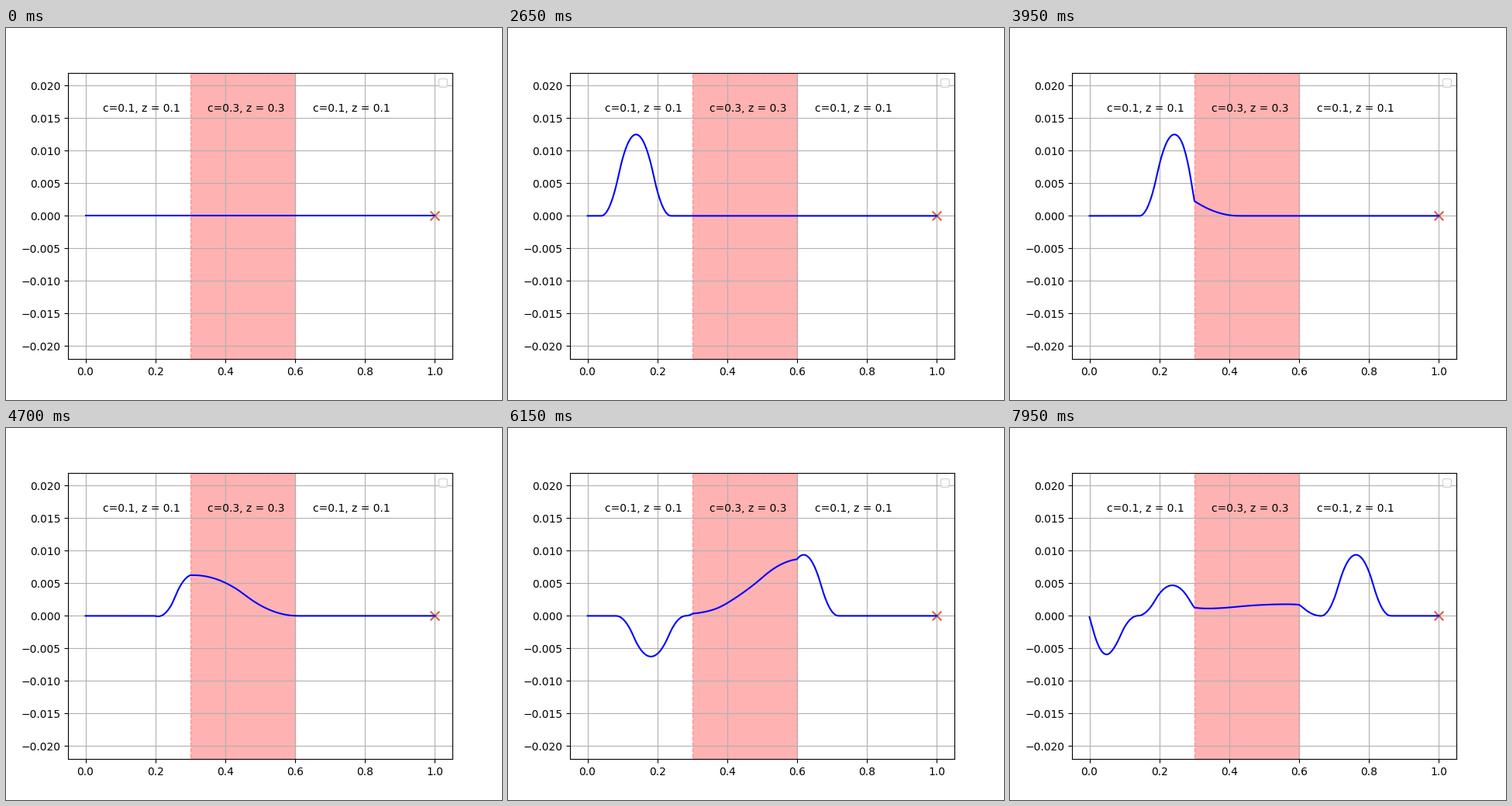
Write a matplotlib script that moves like this. It is 640 px wide and 480 px high and loops after 8 s.

```python
import numpy as np
import matplotlib.pyplot as plt
from matplotlib.animation import FuncAnimation

FRAMES, INTERVAL = 160, 50
START = 18            # frame of the kick; the string rests until then
STEPS, DT = 20, 0.002  # solver steps per frame, step length
N = 1000
LEFT, RIGHT = 0.3, 0.6
SLOW, FAST = 0.1, 0.3

x = np.linspace(0, 1, N)
dx = x[1] - x[0]


def solve():
    """Leapfrog solution of u_tt = (c^2 u_x)_x with fixed ends."""
    edges = np.linspace(-dx / 2, 1 + dx / 2, N + 1)
    c = np.where((edges > LEFT) & (edges < RIGHT), FAST, SLOW)
    k = (c * DT / dx) ** 2
    kick = 0.05 * np.clip(1 - np.abs(x + dx - 0.05) / 0.05, 0, None)
    u, step = np.zeros(N), kick * DT
    states = []
    for i in range(FRAMES):
        states.append(u.copy())
        if i < START:
            continue
        for _ in range(STEPS):
            u = u + step
            slope = np.diff(u, prepend=0, append=0)
            step = step + np.diff(k * slope)
    return states


states = solve()

fig, ax = plt.subplots(figsize=(6.4, 4.8), dpi=100)
ax.set_xlim(-0.05, 1.05)
ax.set_ylim(-0.022, 0.022)
ax.grid()
ax.axvspan(LEFT, RIGHT, color="red", alpha=0.3, linestyle="--")
for pos, value in ((0.05, SLOW), (0.35, FAST), (0.65, SLOW)):
    ax.text(pos, 0.016, f"c={value}, z = {value}")
ax.scatter([1], [0], s=70, marker="x", color="#d9603b")
line, = ax.plot(x, states[0], color="blue")
ax.legend(handles=[])


def draw(i):
    line.set_ydata(states[i])
    return line,


anim = FuncAnimation(fig, draw, frames=FRAMES, interval=INTERVAL,
                     repeat=True, repeat_delay=0)
plt.show()
```
